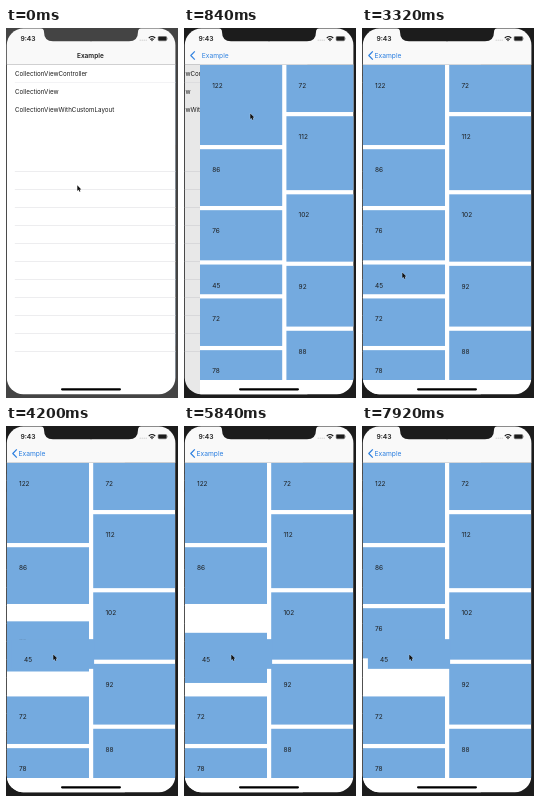
Animation, 172 px wide and 370 px high, one loop 8 s. Source, as an HTML page with a canvas:

```html
<!DOCTYPE html>
<html lang="en">
<head>
<meta charset="utf-8">
<title>Collection view reorder</title>
<style>
html, body { margin: 0; width: 100%; height: 100%; overflow: hidden; background: #1c1c1c; }
canvas { display: block; width: 172px; height: 370px; }
</style>
</head>
<body>
<canvas id="stage"></canvas>
<script>
const W = 172, H = 370, LOOP = 8000;
const LEFT = 0.8, TOP = 0.6, SCREEN_W = 168.6, SCREEN_H = 365.6;
const NAV_BOTTOM = 36.5, SAFE_BOTTOM = 352, ROW = 18;
const GAP = 4.2, COL_W = (SCREEN_W - GAP) / 2, UNIT = 0.66;
const INK = '#1c1c1c', BLUE = '#74aadf', TINT = '#2b7fe0';
const FONT = 'Inter, Roboto, "Liberation Sans", sans-serif';
const COLUMNS = [[122, 86, 76, 45, 72, 78], [72, 112, 102, 92, 88]];
const LIFTED = 45, NEIGHBOUR = 76;
const PUSH = 580, LIFT = 3320;

const canvas = document.getElementById('stage');
const dpr = window.devicePixelRatio || 1;
canvas.width = W * dpr;
canvas.height = H * dpr;
const c = canvas.getContext('2d');

const clamp = u => Math.max(0, Math.min(1, u));
const mix = (a, b, u) => a + (b - a) * u;
const ease = (t, from, to) => {
  const u = clamp((t - from) / (to - from));
  return u * u * (3 - 2 * u);
};

// Applies eased moves [from, to, target] one after another.
const follow = (t, start, moves) =>
  moves.reduce((v, [from, to, target]) => mix(v, target, ease(t, from, to)), start);

function pointer(t) {
  const swing = Math.sin(Math.PI * ease(t, 1000, 2080));
  const x = follow(t, 71, [[160, 320, 66], [1000, 2080, 40], [3400, 3900, 47]]);
  const y = follow(t, 157, [[0, 40, 142], [160, 320, 85], [1000, 2080, 244], [3400, 3900, 228]]);
  return [x + 42 * swing, y];
}

// How far the neighbour has made room: 0 is its own slot, 1 the slot below.
const yielded = t => follow(t, 0, [
  [3760, 4100, 0.47], [4100, 4480, 0],
  [4780, 5160, 1], [5160, 5560, 0.5], [5560, 6160, 1],
  [6600, 7060, 0], [7060, 7400, 0.78], [7400, 7600, 0]
]);

function rect(x, y, w, h, fill) {
  c.fillStyle = fill;
  c.fillRect(x, y, w, h);
}

function round(x, y, w, h, r, fill) {
  c.beginPath();
  c.roundRect(x, y, w, h, r);
  c.fillStyle = fill;
  c.fill();
}

function text(s, x, y, size, fill = INK, weight = 400) {
  c.font = `${weight} ${size}px ${FONT}`;
  c.fillStyle = fill;
  c.fillText(s, x, y + size * 0.36);
}

function cell(n, x, y) {
  rect(x, y, COL_W, n * UNIT, BLUE);
  text(n, x + 12.2, y + 20.7, 6.5);
}

function drawList(x) {
  rect(x, NAV_BOTTOM, SCREEN_W, SCREEN_H, '#fff');
  rect(x + 8, 54, SCREEN_W, 0.6, '#ececee');
  for (let i = 0; i <= 10; i++) rect(x + 8, 143 + i * ROW, SCREEN_W, 0.7, '#e6e6e8');
  ['CollectionViewController', 'CollectionView', 'CollectionViewWithCustomLayout']
    .forEach((s, i) => text(s, x + 8.2, 45.4 + ROW * i, 6.22));
}

function drawGrid(x, t, [px, py]) {
  rect(x, NAV_BOTTOM, SCREEN_W, SCREEN_H, '#fff');
  c.save();
  c.beginPath();
  c.rect(x, NAV_BOTTOM, SCREEN_W, SAFE_BOTTOM - NAV_BOTTOM);
  c.clip();
  const pitch = LIFTED * UNIT + GAP;
  let home = 0;
  COLUMNS.forEach((column, i) => {
    let y = NAV_BOTTOM;
    for (const n of column) {
      const shift = n === NEIGHBOUR ? pitch * yielded(t) : 0;
      if (n === LIFTED) home = y;
      else cell(n, x + i * (COL_W + GAP), y + shift);
      y += n * UNIT + GAP;
    }
  });
  // The lifted cell centres itself under the pointer.
  const lift = ease(t, LIFT, LIFT + 240);
  cell(LIFTED, mix(x, px - COL_W / 2, lift), mix(home, py - LIFTED * UNIT / 2, lift));
  c.restore();
}

function drawNav(p) {
  rect(0, 0, W, NAV_BOTTOM, '#f9f9f9');
  rect(0, NAV_BOTTOM - 0.5, W, 0.5, '#d2d2d4');
  const x = mix(71, 12.5, p);
  c.globalAlpha = clamp(1 - p * 1.6);
  text('Example', x, 27.5, 6.5, INK, 600);
  c.globalAlpha = clamp(p * 1.6 - 0.5);
  text('Example', x, 27.5, 6.7, TINT);
  c.strokeStyle = TINT;
  c.lineWidth = 1.2;
  c.stroke(new Path2D('M10.8 23.4l-4 4.1l4 4.1'));
  c.globalAlpha = 1;
}

function drawStatus() {
  text('9:43', 14.4, 10.8, 6.7, INK, 600);
  for (let i = 0; i < 4; i++) round(133.6 + i * 2, 11.6, 1.2, 1.2, 0.6, '#c8c8c8');
  c.strokeStyle = INK;
  c.lineWidth = 1.2;
  for (const r of [2.2, 4.3]) {
    c.beginPath();
    c.arc(146, 13, r, -Math.PI * 0.77, -Math.PI * 0.23);
    c.stroke();
  }
  round(145.3, 11.8, 1.4, 1.4, 0.7, INK);
  round(151.7, 8, 9.4, 5.2, 1.4, '#999');
  round(152.4, 8.7, 8, 3.8, 0.8, INK);
  rect(161.4, 9.8, 0.6, 1.6, '#999');
}

function drawNotch(fill) {
  c.fillStyle = fill;
  for (const side of [-1, 1]) {
    const at = d => 85 + side * d;
    c.beginPath();
    c.moveTo(at(-0.5), 0);
    c.lineTo(at(50), 0);
    c.quadraticCurveTo(at(47), 0.8, at(47), 4);
    c.quadraticCurveTo(at(47), 13.3, at(38), 13.3);
    c.lineTo(at(-0.5), 13.3);
    c.fill();
  }
}

function drawCursor([x, y]) {
  const arrow = new Path2D('M0 0V5.6L1.3 4.5L2.2 6.5L3.1 6.1L2.3 4.2H4Z');
  c.translate(x + 0.3, y + 0.4);
  c.lineJoin = 'round';
  c.lineWidth = 0.5;
  c.strokeStyle = 'rgba(255,255,255,0.7)';
  c.stroke(arrow);
  c.fillStyle = '#111';
  c.fill(arrow);
}

function draw(t) {
  const bezel = t < 560 ? '#444' : '#1c1c1c';
  const cursor = pointer(t);
  // Critically damped spring.
  const k = Math.max(0, t - PUSH) * 0.0154;
  const p = 1 - (1 + k) * Math.exp(-k);

  c.setTransform(dpr, 0, 0, dpr, 0, 0);
  rect(0, 0, W, H, bezel);
  c.save();
  c.beginPath();
  c.roundRect(LEFT, TOP, SCREEN_W, SCREEN_H, 16.5);
  c.clip();
  drawList(LEFT - 0.3 * SCREEN_W * p);
  rect(0, NAV_BOTTOM, W, H, `rgba(0,0,0,${0.1 * p})`);
  drawGrid(LEFT + SCREEN_W * (1 - p), t, cursor);
  drawNav(p);
  drawStatus();
  round(55, 360.2, 60, 2.2, 1.1, '#000');
  c.restore();
  drawNotch(bezel);
  drawCursor(cursor);
}

const start = performance.now();
function frame() {
  draw((performance.now() - start) % LOOP);
  requestAnimationFrame(frame);
}
frame();
</script>
</body>
</html>
```
